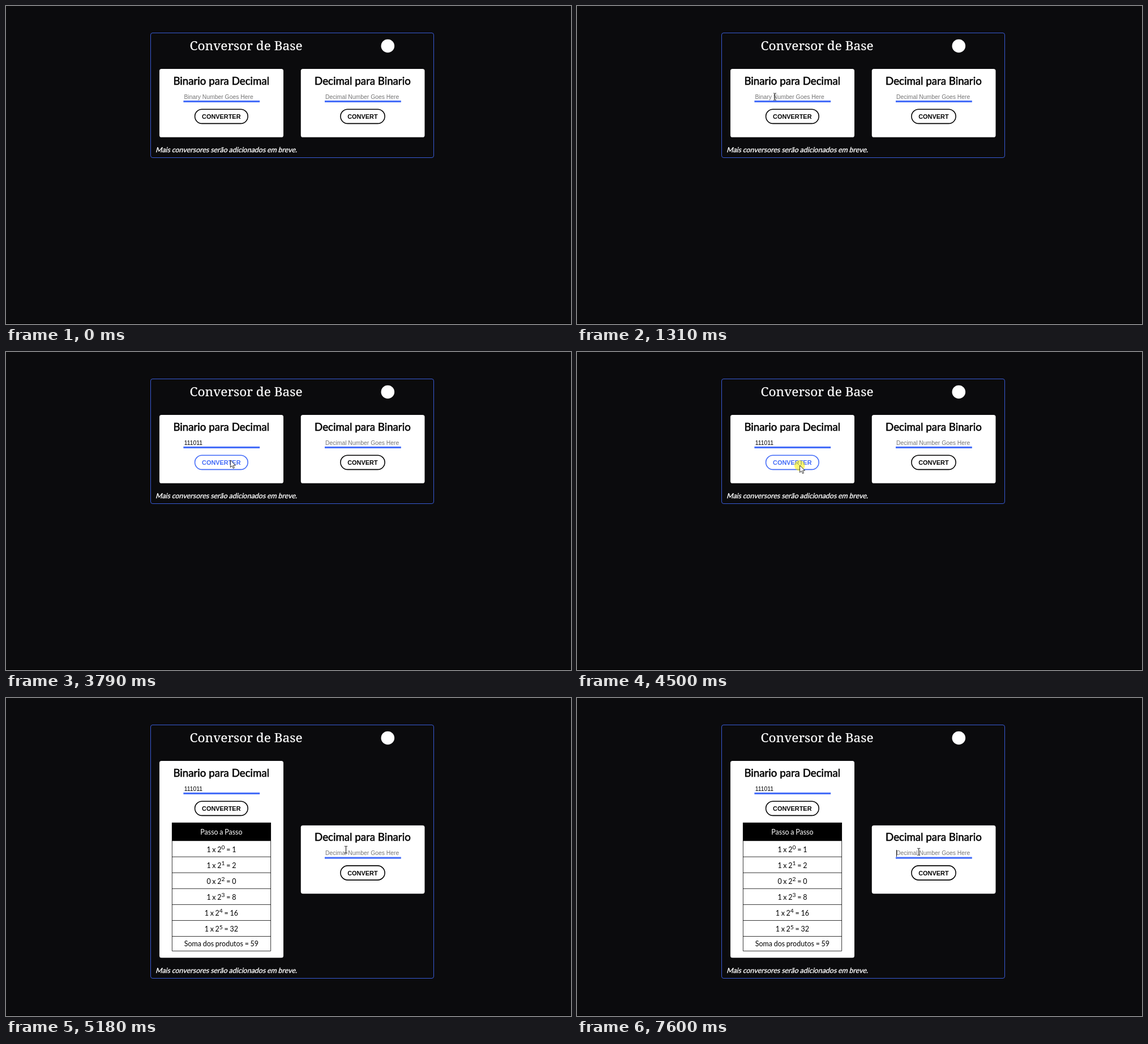
An HTML page that plays this animation: 998x561 px, repeating every 8000 ms.

```html
<!DOCTYPE html>
<html lang="pt">
<head>
<meta charset="utf-8">
<title>Conversor de Base</title>
<style>
  html, body { margin: 0; width: 100%; height: 100%; overflow: hidden; background: #0b0b0d; }
  svg { display: block; width: 998px; height: 561px; --blue: #416af8; }
  text { font: 12.475px Lato, sans-serif; }
  .mid { text-anchor: middle; }
  .title { font: 22.65px "Noto Serif", serif; fill: #fff; stroke: #fff; stroke-width: .2px; }
  .heading { font-size: 18.7px; stroke: #000; stroke-width: .55px; }
  .note { fill: #fff; stroke: #fff; stroke-width: .35px; }
  .note, #table text { word-spacing: -.04em; }
  .field { font: 10.396px "Liberation Sans", Arial, sans-serif; }
  .hint { fill: #757575; }
  .button text { font: bold 10.92px "Liberation Sans", Arial, sans-serif; }
  .button rect { fill: #fff; stroke: #000; stroke-width: 1.56px; }
  .button.hover text { fill: var(--blue); }
  .button.hover rect { stroke: var(--blue); }
  .card { fill: #fff; height: 120.5px; }
  .line { fill: var(--blue); }
  #frame { fill: none; stroke: var(--blue); stroke-width: .85px; height: 220px; }
  #table { visibility: hidden; }
  #table path { fill: none; stroke: #000; stroke-width: .8px; }
  #table .power { font-size: 10.4px; }
  .open #frame { height: 447px; }
  .open #left { height: 347.3px; }
  .open #right { transform: translateY(113.7px); }
  .open #note { transform: translateY(226.8px); }
  .open #table { visibility: visible; }
</style>
</head>
<body>
<svg id="stage" viewBox="0 0 998 561">
  <rect width="998" height="561" fill="#0b0b0d"/>
  <rect y="560" width="998" height="1"/>
  <rect id="frame" x="255.5" y="47.5" width="500" rx="3.5"/>
  <text class="title" x="324.6" y="78">Conversor de Base</text>
  <circle cx="674.3" cy="70.5" r="11.8" fill="#fff"/>

  <rect id="left" class="card" x="271" y="111" width="219" rx="3.6"/>
  <text class="heading mid" x="380.3" y="138.8">Binario para Decimal</text>
  <text id="binaryHint" class="field hint" x="314.5" y="163.8">Binary Number Goes Here</text>
  <text id="typed" class="field" x="314.8" y="163.8"></text>
  <rect class="line" x="313.4" y="166.8" width="134.8" height="3.1"/>
  <g id="convert" class="button">
    <rect x="333.6" y="182.2" width="93.6" height="25.2" rx="12.6"/>
    <text class="mid" x="380.3" y="199">CONVERTER</text>
  </g>
  <g id="table"><rect x="293" y="219.8" width="175" height="32.4"/></g>

  <g id="right">
    <rect class="card" x="520.8" y="111" width="218.7" rx="3.6"/>
    <text class="heading mid" x="629.9" y="138.8">Decimal para Binario</text>
    <text class="field hint" x="564" y="163.8">Decimal Number Goes Here</text>
    <rect class="line" x="563" y="166.8" width="134.8" height="3.1"/>
    <g class="button">
      <rect x="590.9" y="182.2" width="78.2" height="25.2" rx="12.6"/>
      <text class="mid" x="629.9" y="199">CONVERT</text>
    </g>
  </g>

  <g id="note"><text class="note" transform="translate(264 257.8) skewX(-14)">Mais conversores serão adicionados em breve.</text></g>

  <rect id="caret" width=".9" height="12"/>
  <g id="pointer">
    <circle id="press" r="9.3" fill="#faf000" opacity=".57"/>
    <path id="arrow" d="M0 0V12.6L2.9 9.9L4.9 14.4L6.9 13.5L5 9.2H8.9Z" fill="#fff" stroke="#000" stroke-width=".8"/>
    <path id="beam" d="M-2.4 -6H-.7L0 -5.5L.7 -6H2.4M0 -5.5V5.5M-2.4 6H-.7L0 5.5L.7 6H2.4" fill="none" stroke="#000" stroke-width=".95"/>
  </g>
</svg>
<script>
const LOOP = 8000, OPEN = 4570, BITS = "111011";
const $ = id => document.getElementById(id);
const stage = $("stage"), typed = $("typed");

const keyTimes = [2240, 2420, 2560, 2710, 2880, 3020];
const caretToggles = [1390, 1930, 2240, 3560, 4100, 4500, 5500, 6050, 6520, 7040, 7600];
const presses = [[1390, 1460], [4500, 4570], [5500, 5580]];
const start = { x: 968, y: 576 };
const moves = [
  { from: 220, to: 820, steps: 9, x: 351, y: 157 },
  { from: 1080, to: 1310, steps: 4, x: 349.5, y: 160 },
  { from: 1610, to: 1700, steps: 2, x: 406.5, y: 158 },
  { from: 3560, to: 4020, steps: 7, x: 393.6, y: 200 },
  { from: 4800, to: 5180, steps: 6, x: 600.5, y: 267.5 },
  { from: 5340, to: 5420, steps: 2, x: 603.7, y: 271.3 }
];

function buildTable() {
  const rowText = (y, html, fill = "#000") =>
    `<text class="mid" x="380.4" y="${y}" fill="${fill}">${html}</text>`;
  let html = rowText(240.8, "Passo a Passo", "#fff");
  let lines = "M293.4 220V446.3H467.6V220";
  let sum = 0;
  [...BITS].reverse().forEach((bit, i) => {
    const product = bit * 2 ** i;
    sum += product;
    html += rowText(272 + 28.07 * i,
      `${bit} x 2<tspan class="power" dy="-4.8">${i}</tspan><tspan dy="4.8"> = ${product}</tspan>`);
    lines += `M293 ${280.2 + 28.07 * i}H468`;
  });
  html += rowText(437.9, `Soma dos produtos = ${sum}`);
  $("table").innerHTML += `${html}<path d="${lines}"/>`;
}

// Each move eases out, but the pointer only jumps at its sampled steps.
function pointerAt(t) {
  let { x, y } = start;
  for (const m of moves) {
    if (t < m.from) break;
    const gap = (m.to - m.from) / (m.steps - 1);
    const step = Math.min(m.steps, Math.floor((t - m.from) / gap + 1e-6) + 1);
    const p = Math.sin(step / m.steps * Math.PI / 2);
    x += (m.x - x) * p;
    y += (m.y - y) * p;
  }
  return { x, y };
}

const inside = (p, x, y, w, h) => p.x >= x && p.x <= x + w && p.y >= y && p.y <= y + h;
const show = (id, on) => $(id).setAttribute("visibility", on ? "visible" : "hidden");
const countPast = (times, t) => times.filter(time => time <= t).length;

function draw(t) {
  const open = t >= OPEN;
  const p = pointerAt(t);
  const overField = inside(p, 313, 151, 135, 19) || inside(p, 563, open ? 265 : 151, 135, 19);
  const visible = t >= moves[0].from;

  stage.classList.toggle("open", open);
  $("convert").classList.toggle("hover", inside(p, 333, 181.5, 95, 26.5));

  const length = countPast(keyTimes, t);
  typed.textContent = BITS.slice(0, length);
  show("binaryHint", !length);

  const inDecimal = t >= 5500;
  $("caret").setAttribute("x", inDecimal ? 564.1 : 314.9 + (length ? typed.getComputedTextLength() : 0));
  $("caret").setAttribute("y", inDecimal ? 268 : 154);
  show("caret", countPast(caretToggles, t) % 2);

  $("pointer").setAttribute("transform", `translate(${p.x} ${p.y})`);
  $("press").setAttribute("transform", overField ? "translate(-1.5 -1)" : "translate(-.4 .4)");
  show("press", presses.some(([from, to]) => t >= from && t < to));
  show("arrow", visible && !overField);
  show("beam", visible && overField);
}

buildTable();
const begin = performance.now();
function tick() {
  draw((performance.now() - begin) % LOOP);
  requestAnimationFrame(tick);
}
tick();
</script>
</body>
</html>
```
